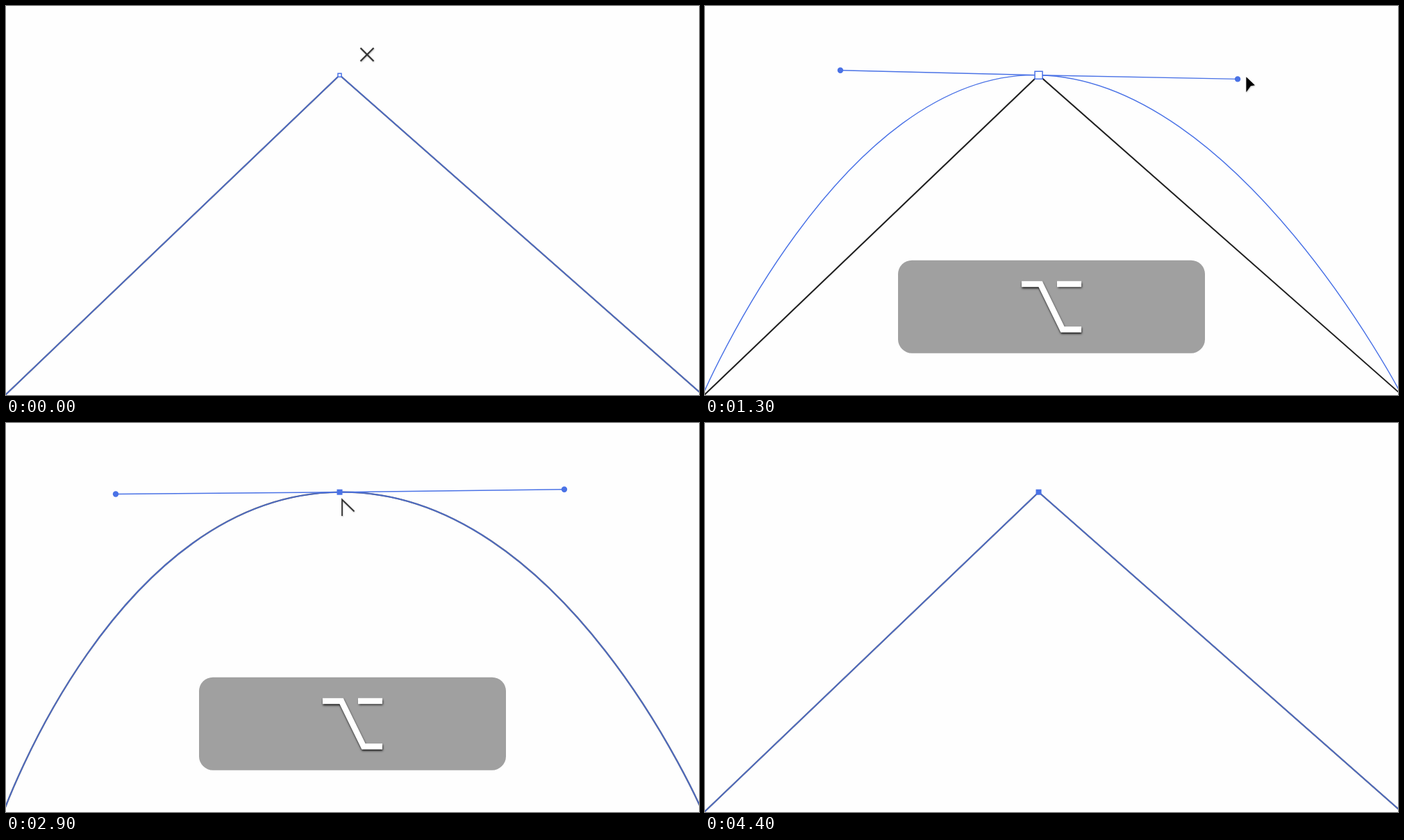
Recreate the animation shown at these times as an HTML page with a canvas. Size 998 by 561 pixels, loop 4700 ms.

```html
<!DOCTYPE html>
<html lang="en">
<head>
<meta charset="utf-8">
<title>Anchor point conversion</title>
<style>
html, body { margin: 0; width: 100%; height: 100%; overflow: hidden; background: #fefefe; }
canvas { display: block; }
</style>
</head>
<body>
<canvas id="stage" width="998" height="561"></canvas>
<script>
const ctx = document.getElementById('stage').getContext('2d');
const LOOP = 4700, STEP = 100;
const BLUE = '#4a72e6', BLACK = '#202020';
const anchor = [480.5, 99.7], pivot = [481, 99.1], pulled = [804, 95.7];
const leftEnd = [-4.7, 564.5], rightEnd = [1003, 560.7];

const ramp = (t, from, to) => Math.min(Math.max((t - from) / (to - from), 0), 1);
const ease = (t, from, to) => {
  const u = ramp(t, from, to);
  return u * u * (3 - 2 * u);
};
const mix = (a, b, u) => a.map((v, i) => v + (b[i] - v) * u);

// The hand sags a little while it drags to the right.
const sag = t => 9.4 * Math.sin(Math.PI * ramp(t, 700, 1600) ** 1.5);

function handleAt(t) {
  const [x, y] = mix(pivot, pulled, ease(t, 700, 1460));
  return [x, y + sag(t)];
}

function pointerAt(t) {
  let p = [520, 70];
  const move = (from, to, x, y) => { p = mix(p, [x, y], ease(t, from, to)); };
  move(100, 700, 482, 99);
  move(576, 1433, 800, 95);
  move(1900, 2500, 600, 150);
  move(2600, 2900, 484, 110);
  move(3200, 3500, 536, 280);
  return [p[0], p[1] + 0.75 * sag(t)];
}

function trace(points, close) {
  ctx.beginPath();
  points.forEach(p => ctx.lineTo(...p));
  if (close) ctx.closePath();
}

function stroke(color, width) {
  ctx.strokeStyle = color;
  ctx.lineWidth = width;
  ctx.stroke();
}

function drawPath(left, right, color, width) {
  ctx.beginPath();
  ctx.moveTo(...leftEnd);
  ctx.bezierCurveTo(...leftEnd, ...left, ...anchor);
  ctx.bezierCurveTo(...right, ...rightEnd, ...rightEnd);
  stroke(color, width);
}

function drawSelected(left, right) {
  drawPath(left, right, '#5c6580', 2.3);
  drawPath(left, right, '#4d6bc6', 1.6);
}

function drawHandles(left, right) {
  trace([left, anchor, right]);
  stroke(BLUE, 1.4);
  ctx.fillStyle = BLUE;
  for (const p of [left, right]) {
    ctx.beginPath();
    ctx.arc(...p, 4.2, 0, 7);
    ctx.fill();
  }
}

function drawAnchor(size, filled) {
  ctx.beginPath();
  ctx.rect(anchor[0] - size / 2, anchor[1] - size / 2, size, size);
  ctx.fillStyle = filled ? BLUE : '#fff';
  ctx.fill();
  if (!filled) stroke(BLUE, 1.5);
}

function shadow(color, blur, dx, dy) {
  ctx.shadowColor = color;
  ctx.shadowBlur = blur;
  ctx.shadowOffsetX = dx;
  ctx.shadowOffsetY = dy;
}

function drawPanel(alpha) {
  ctx.save();
  ctx.globalAlpha = alpha;
  ctx.fillStyle = '#a0a0a0';
  ctx.beginPath();
  ctx.roundRect(278, 366.7, 442, 134, 20);
  ctx.fill();
  shadow('rgba(0,0,0,.85)', 3, 0.5, 2);
  // Option key sign
  trace([[456, 401], [483, 401], [515, 466.5], [542, 466.5]]);
  stroke('#fff', 8.5);
  trace([[507, 401], [542, 401]]);
  stroke('#fff', 8.5);
  ctx.restore();
}

function drawPointer(kind, at) {
  ctx.save();
  ctx.translate(...at);
  shadow('rgba(0,0,0,.3)', 2, 0.5, 1);
  if (kind === 'cross') {
    for (const s of [-9.5, 9.5]) {
      trace([[-9.5, -s], [9.5, s]]);
      stroke('#333', 2.1);
    }
  } else if (kind === 'caret') {
    trace([[0, 24], [0, 0.5], [17.5, 17.5]]);
    stroke('#333', 1.8);
  } else {
    trace([[0, 0], [12.5, 12], [6.5, 13], [0, 22]], true);
    ctx.fillStyle = '#000';
    ctx.fill();
  }
  ctx.restore();
}

function draw(t) {
  const dragging = t >= 800 && t < 2000;
  const curved = t >= 2000 && t < 3300;
  const pressed = t >= 3100 && t < 3300;
  const right = handleAt(t);
  const left = mix(right, pivot, 2);

  ctx.fillStyle = '#fefefe';
  ctx.fillRect(0, 0, 998, 561);

  if (dragging) {
    drawPath(anchor, anchor, BLACK, 2);
    drawPath(left, right, BLUE, 1.4);
    drawHandles(left, right);
  } else if (pressed) {
    drawPath(left, right, BLACK, 2);
  } else if (curved) {
    drawSelected(left, right);
    drawHandles(left, right);
  } else {
    drawSelected(anchor, anchor);
  }

  if (dragging || pressed) drawAnchor(11, false);
  else if (t < 800) drawAnchor(5, false);
  else drawAnchor(8, true);

  drawPanel(ramp(t, 200, 500) * ramp(t, 4400, 4100));

  if (t < 4300) {
    const kind = t < 400 || t >= 3900 ? 'cross' : dragging ? 'arrow' : 'caret';
    drawPointer(kind, pointerAt(t));
  }
}

function tick() {
  const t = performance.now() % LOOP;
  draw(Math.floor(t / STEP) * STEP);
  requestAnimationFrame(tick);
}
tick();
</script>
</body>
</html>
```
